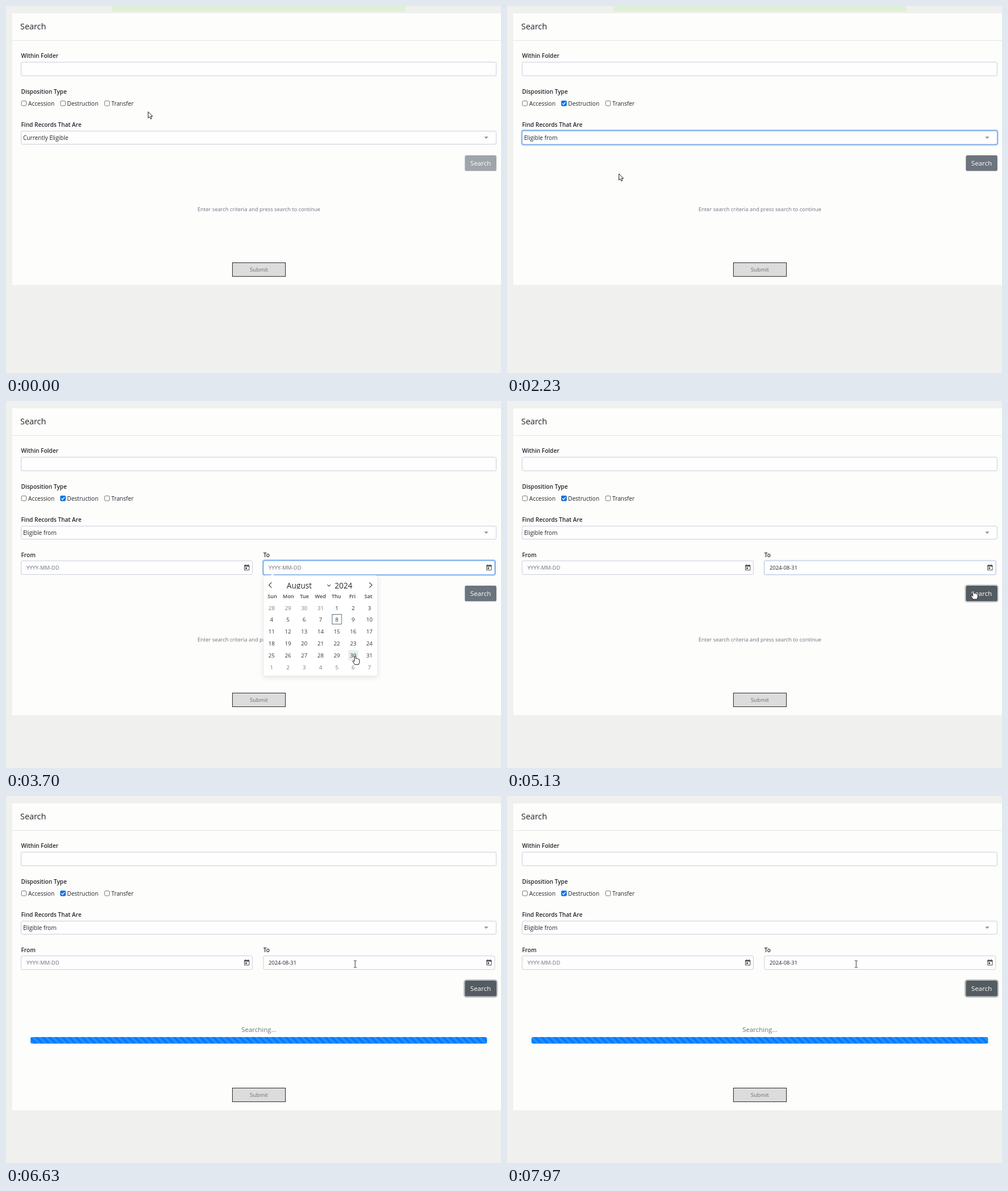
An HTML page that plays this animation: 869 px wide and 644 px high, repeating every 8 s.

```html
<!DOCTYPE html>
<html lang="en">
<head>
<meta charset="utf-8">
<title>Record search</title>
<style>
  html, body { margin: 0; width: 100%; height: 100%; overflow: hidden; background: #f0f0ef; }
  svg { display: block; width: 869px; height: 644px; }
  text { font: 10.08px "Open Sans", sans-serif; fill: #212529; white-space: pre; }
  .title { font-size: 14.4px; }
  .label { font-weight: 600; }
  .button { font-size: 11.52px; fill: #fff; }
  .small { font-size: 9.36px; }
  .muted { fill: #6c757d; }
  .mid { text-anchor: middle; }
  .month { font-size: 13.6px; fill: #2b2b2b; }
  .weekday { font-size: 9.07px; font-weight: 600; fill: #444; }
  .day { font-size: 9.7px; fill: #333; }
  .other { fill: #7c7c7c; }
  .field { fill: #fefefe; stroke: #cbcfdb; }
  .ring { fill: none; stroke: #8fbaf0; stroke-width: 2.6; }
  .line { fill: none; stroke: #444; stroke-width: 1.2; }
  .cursor { fill: #fff; stroke: #222; stroke-width: 1; stroke-linejoin: round; }
</style>
</head>
<body>
<svg viewBox="0 0 869 644">
  <defs>
    <g id="dateIcon">
      <path d="M.6 1.6H8.9V10H.6Z" fill="none" stroke="#4a4a4a"/>
      <path d="M.5 1.5H9V3.8H.5ZM2 0H3.1V2H2ZM6.4 0H7.5V2H6.4ZM2.2 5.3H5V8H2.2Z" fill="#4a4a4a"/>
    </g>
    <rect id="box" width="8.4" height="8.4" rx="1.4" fill="#fff" stroke="#767676"/>
    <pattern id="stripes" width="11.52" height="11.52" patternUnits="userSpaceOnUse">
      <path d="M0 0L11.52 11.52H5.76L0 5.76ZM5.76 0H11.52V5.76Z" fill="#fff" fill-opacity=".15"/>
    </pattern>
    <filter id="shadow" x="-10%" y="-10%" width="120%" height="125%">
      <feDropShadow dx="0" dy="2.2" stdDeviation="4.5" flood-opacity=".1"/>
    </filter>
  </defs>

  <rect width="869" height="644" fill="#f0f0ef"/>
  <rect data-show="0 2900" data-fade="120" x="186" width="516" height="9.5" fill="#def0d6"/>
  <rect id="panel" x="11" y="13" width="860" fill="#fdfdfc"/>
  <path d="M11 60.5H869" stroke="#e3e5e6"/>
  <text class="title" x="25" y="41">Search</text>

  <text class="label" x="26.5" y="91.3">Within Folder</text>
  <rect class="field" x="26.5" y="98.5" width="834" height="24" rx="2.5"/>

  <text class="label" x="26.5" y="153.6">Disposition Type</text>
  <use href="#box" x="27.2" y="166.6"/><text x="39" y="174.5">Accession</text>
  <use href="#box" x="95.8" y="166.6"/><text x="107.3" y="174.5">Destruction</text>
  <use href="#box" x="173.2" y="166.6"/><text x="185" y="174.5">Transfer</text>
  <g data-show="750 8000">
    <rect x="95.3" y="166.1" width="9.4" height="9.4" rx="1.6" fill="#0b74e5"/>
    <path d="M97.2 171L99.2 173L102.9 168.6" fill="none" stroke="#fff" stroke-width="1.4"/>
  </g>

  <text class="label" x="26.5" y="212.3">Find Records That Are</text>
  <rect class="field" x="26.5" y="219.5" width="834" height="23" rx="2.5"/>
  <rect class="ring" data-show="1400 2800" data-fade="110" x="26" y="218.3" width="835.2" height="25.2" rx="3"/>
  <text data-show="0 2150" x="30" y="234.5">Currently Eligible</text>
  <text data-show="2150 8000" x="30" y="234.5">Eligible from</text>
  <path d="M839.5 229.2H846.7L843.1 233Z" fill="#8e918c"/>

  <g data-show="2270 8000">
    <text class="label" x="26.5" y="273.5">From</text>
    <rect class="field" x="26.5" y="280.5" width="406" height="24" rx="2.5"/>
    <text class="small muted" x="36" y="296.2">YYYY-MM-DD</text>
    <use href="#dateIcon" x="418" y="286.7"/>
    <text class="label" x="451.7" y="273.5">To</text>
    <rect class="field" x="451.9" y="280.5" width="406" height="24" rx="2.5"/>
    <rect class="ring" data-show="2800 5020" data-fade="140" x="451.2" y="279.6" width="407.6" height="25.6" rx="3"/>
    <text class="small muted" data-show="2270 4250" x="461" y="296.2">YYYY-MM-DD</text>
    <text class="small" data-show="4250 8000" x="461" y="296.2">2024-08-31</text>
    <use href="#dateIcon" x="843.2" y="286.7"/>
  </g>

  <g id="lower">
    <rect id="searchButton" x="805.5" y="262" width="55.5" height="27.6" rx="2.9"/>
    <rect data-show="5030 8000" data-fade="150" x="804.4" y="260.9" width="57.7" height="29.8" rx="4"
          fill="none" stroke="#828a91" stroke-opacity=".55" stroke-width="2.3"/>
    <text class="button mid" x="833.2" y="279.9">Search</text>
    <text class="small muted mid" data-show="0 5250" x="444" y="360">Enter search criteria and press search to continue</text>
    <g data-show="5250 8000">
      <text class="mid muted" style="font-size:11.52px" x="444" y="352">Searching...</text>
      <rect x="43" y="361" width="801.5" height="11.52" rx="2.9" fill="#007bff"/>
      <rect x="43" y="361" width="801.5" height="11.52" rx="2.9" fill="url(#stripes)"/>
    </g>
    <rect x="397.5" y="450.5" width="93" height="24" fill="#dcdcdc" stroke="#2c2c2c"/>
    <text class="mid" style="font-size:9.6px;fill:#6d6d6d" x="444" y="465.6">Submit</text>
  </g>

  <g data-show="1400 2150">
    <rect x="26.5" y="244.5" width="834" height="52" fill="#fff" stroke="#888"/>
    <rect id="optionBar" x="27" width="833" height="17" fill="#1e78d7"/>
    <g id="options"></g>
  </g>

  <g id="calendar" data-show="2800 4260" data-fade="150">
    <rect x="452" y="306" width="200.4" height="176.5" rx="3.6" fill="#fff" stroke="#e6e6e6" stroke-width=".8" filter="url(#shadow)"/>
    <path d="M464 306.6L467.7 302.9L471.4 306.6Z" fill="#fff"/>
    <path class="line" d="M466.3 318.3L461.6 323L466.3 327.7M637.9 318.3L642.6 323L637.9 327.7"/>
    <path class="line" d="M564.2 322.3L566.9 325L569.6 322.3" stroke-width="1.5"/>
    <text class="month" x="492.8" y="328.6">August</text>
    <rect x="490" y="329.8" width="60" height="4" fill="#fff"/>
    <text class="month" x="577" y="328.6">2024</text>
    <rect data-show="3500 3860" x="600.8" y="437.3" width="17.4" height="17.6" fill="#e6eef2"/>
    <rect data-show="3860 4260" x="629.4" y="437.3" width="17.4" height="17.6" fill="#e6eef2"/>
    <rect x="572.5" y="374.5" width="16.6" height="17" fill="none" stroke="#5a7184"/>
  </g>

  <g id="pointer">
    <path id="arrow" class="cursor" d="M.5 .5V11.6L3 9.3L4.8 13.3L6.8 12.4L5 8.6H8.4Z"/>
    <path id="hand" class="cursor" d="M-1.2 1.2Q0 -.6 1.2 1.2V5.2Q2.4 4.3 3.4 5.5Q4.6 4.7 5.6 6Q7.4 5.5 7.6 7.4V11L6.2 15.4H-.8L-4.3 10.2Q-4.6 8.2 -2.8 8.8L-1.2 10.2Z"/>
    <path id="beam" fill="none" stroke="#333" d="M-2.5 -6H-.8L0 -5.2L.8 -6H2.5M0 -5.2V5.2M-2.5 6H-.8L0 5.2L.8 6H2.5"/>
  </g>
</svg>
<script>
  const LOOP = 8000;
  const $ = id => document.getElementById(id);
  const clamp = (v, lo, hi) => Math.min(hi, Math.max(lo, v));
  const ease = p => p * p * (3 - 2 * p);

  function addText(parent, content, x, y, className = '') {
    const el = document.createElementNS('http://www.w3.org/2000/svg', 'text');
    el.setAttribute('class', className);
    el.setAttribute('x', x);
    el.setAttribute('y', y);
    el.textContent = content;
    parent.append(el);
    return el;
  }

  const options = ['Currently Eligible', 'Eligible as of', 'Eligible from']
    .map((name, i) => addText($('options'), name, 30, 257.2 + i * 17));

  ['Sun', 'Mon', 'Tue', 'Wed', 'Thu', 'Fri', 'Sat'].forEach((name, i) =>
    addText($('calendar'), name, 467.6 + i * 28.1, 345.8, 'weekday mid'));
  for (let i = 0; i < 42; i++) {
    const date = new Date(2024, 6, 28 + i);
    const tone = date.getMonth() === 7 ? '' : ' other';
    addText($('calendar'), date.getDate(), 466.3 + (i % 7) * 28.63,
      366.5 + Math.floor(i / 7) * 20.93, 'day mid' + tone);
  }

  // Pointer legs: start, end, target x, target y
  const legs = [
    [0, 0, 249, 185],
    [60, 600, 100, 170],
    [880, 1300, 200, 230],
    [1480, 2050, 196, 294],
    [2300, 2720, 600, 293],
    [2960, 3600, 613, 447],
    [3780, 3960, 638, 447],
    [4380, 4960, 819, 332.5],
    [5350, 5900, 613, 295]
  ];
  function pointerAt(t) {
    let x = 0, y = 0;
    for (const [start, end, toX, toY] of legs) {
      if (t < start) break;
      const p = ease(clamp((t - start) / (end - start || 1), 0, 1));
      const k = end === start ? 1 : p;
      x += (toX - x) * k;
      y += (toY - y) * k;
    }
    return [x, y];
  }

  function pointerShape(t, x, y) {
    const inside = (l, top, r, b) => x > l && x < r && y > top && y < b;
    if (t > 2270 && (inside(27, 280, 433, 305) || inside(452, 280, 858, 305))) return 'beam';
    if (t > 2800 && t < 4260 && inside(452, 353, 652, 478)) return 'hand';
    if (t > 2270 && inside(805, 324, 861, 352)) return 'hand';
    return 'arrow';
  }

  const timed = [...document.querySelectorAll('[data-show]')].map(el => {
    const [from, to] = el.dataset.show.split(' ').map(Number);
    return { el, from, to, fade: Number(el.dataset.fade || 0) };
  });
  function visibility({ from, to, fade }, t) {
    if (!fade) return t >= from && t < to ? 1 : 0;
    const fadeIn = from === 0 ? 1 : clamp((t - from) / fade, 0, 1);
    const fadeOut = to === LOOP ? 1 : 1 - clamp((t - to) / fade, 0, 1);
    return fadeIn * fadeOut;
  }

  function buttonColor(t) {
    if (t < 750) return '#9fa5a9';
    if (t < 4900) return '#6c757d';
    return t < 5020 ? '#5a6268' : '#545c62';
  }

  function render(now) {
    const t = now % LOOP;
    for (const item of timed) item.el.style.opacity = visibility(item, t);

    const shift = t < 2270 ? 0 : 62;
    $('panel').setAttribute('height', 476.5 + shift);
    $('lower').setAttribute('transform', `translate(0 ${shift})`);
    $('searchButton').setAttribute('fill', buttonColor(t));

    const travel = 11.52 * (1 - ((t - 5250 + LOOP) % 1000) / 1000);
    $('stripes').setAttribute('patternTransform', `translate(${43 + travel} 361)`);

    const [x, y] = pointerAt(t);
    const row = clamp(Math.floor((y - 245) / 17), 0, 2);
    $('optionBar').setAttribute('y', 245 + row * 17);
    options.forEach((el, i) => { el.style.fill = i === row ? '#fff' : '#212529'; });

    const shape = pointerShape(t, x, y);
    $('pointer').setAttribute('transform', `translate(${x} ${y})`);
    for (const id of ['arrow', 'hand', 'beam']) {
      $(id).style.display = id === shape ? '' : 'none';
    }
    requestAnimationFrame(frame);
  }

  const begin = performance.now();
  function frame() { render(performance.now() - begin); }
  frame();
</script>
</body>
</html>
```
